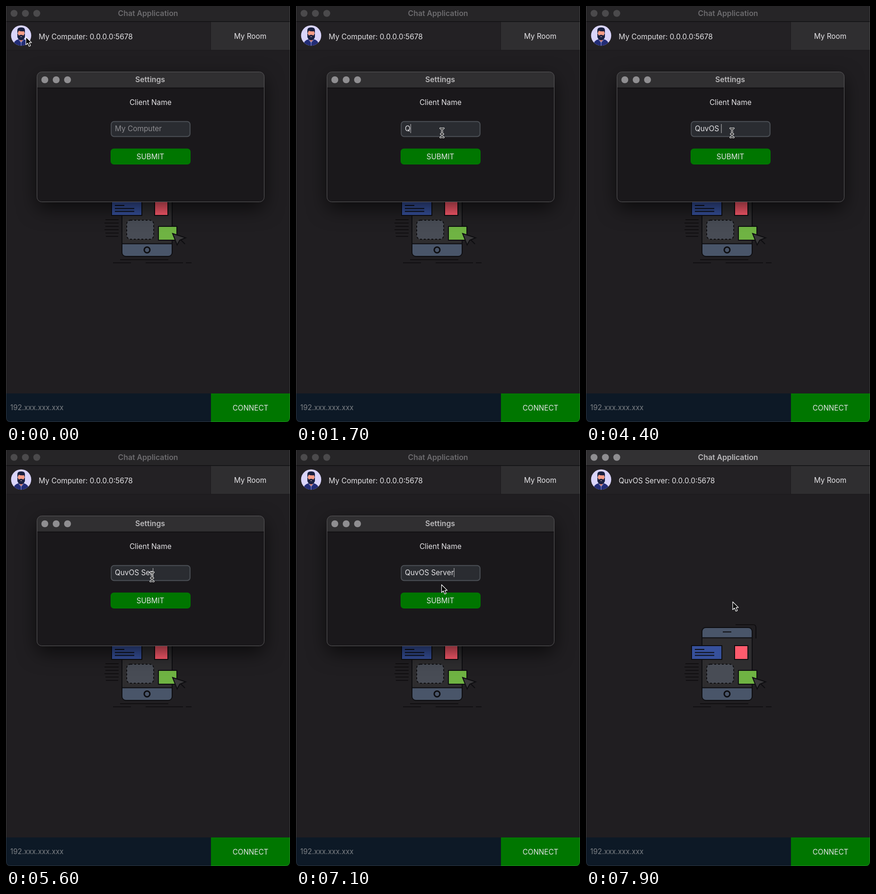
An HTML page for the animation above (8 s loop, 600 by 874 pixels).

```html
<!DOCTYPE html>
<html lang="en">
<head>
<meta charset="utf-8">
<title>Chat Application</title>
<style>
  html, body { margin: 0; width: 100%; height: 100%; overflow: hidden; background: #000; }
  svg { display: block; width: 600px; height: 874px; }
  text { font: 15.4px Inter, "Open Sans", sans-serif; fill: #e4e3e6; white-space: pre; }
  .mid { text-anchor: middle; }
  .title { font-size: 15.8px; font-weight: 600; fill: #b9b8ba; }
  .hint { fill: #7c8085; }
  .ink { stroke: #0d0d10; stroke-width: 2; }
  .thin { stroke: #0c0b0d; stroke-width: 1.7; fill: none; }
  .lights { fill: #8f8e91; }
  .inactive .bar { fill: #262527; }
  .inactive .main-title { fill: #6c6b6e; }
  .inactive .main-lights { fill: #4b4a4c; }
  .dialog-shadow { filter: drop-shadow(0 14px 20px rgba(0, 0, 0, .62)); }
</style>
</head>
<body>
<svg viewBox="0 0 600 874">
  <defs>
    <clipPath id="window"><path d="M0 0H600V864Q600 874 590 874H10Q0 874 0 864Z"/></clipPath>
    <clipPath id="face"><circle cx="32" cy="62" r="21.3"/></clipPath>
    <clipPath id="panel"><rect x="65.5" y="138.5" width="480" height="273" rx="10"/></clipPath>
    <path id="beam" d="M-3.5 -9Q0 -9 0 -6Q0 -9 3.5 -9M0 -6V7M-3.5 10Q0 10 0 7Q0 10 3.5 10M-2.5 3H2.5"/>
  </defs>

  <g id="app" clip-path="url(#window)">
    <rect width="600" height="874" fill="#201e21"/>
    <rect class="bar" width="600" height="33" fill="#323133"/>
    <rect y="32" width="600" height="1.5" fill="#0f0e10"/>
    <g class="lights main-lights">
      <circle cx="17" cy="15.5" r="7.3"/><circle cx="41" cy="15.5" r="7.3"/><circle cx="65" cy="15.5" r="7.3"/>
    </g>
    <text class="title main-title mid" x="300" y="20.7">Chat Application</text>

    <rect y="33.5" width="432" height="59" fill="#232124"/>
    <rect x="433" y="33.5" width="167" height="59" fill="#2f2e30"/>
    <path d="M432.5 33V93M0 93H600" stroke="#1b191c"/>
    <g clip-path="url(#face)">
      <rect x="10" y="40" width="44" height="44" fill="#d9d4fb"/>
      <path d="M16 84Q16 72 26 70L32 68L38 70Q48 72 48 84Z" fill="#232d76"/>
      <path d="M28 64H36V71L32 76L28 71Z" fill="#e98b78"/>
      <path d="M25 51H39V62Q38 69 32 69Q26 69 25 62Z" fill="#f59c86"/>
      <path d="M24 58V51Q24 45 31 45Q40 44 40 51V58L38 53Q32 54 27 52Z" fill="#181f3f"/>
      <path d="M24 57L27 62Q32 59 37 62L40 57V65Q38 72 32 72Q26 72 24 65Z" fill="#181f3f"/>
      <path d="M30.5 64.5H33.5" stroke="#f3d5d4"/>
      <path d="M27 71L32 77L37 71M32 77V84" fill="none" stroke="#9aa0d8"/>
    </g>
    <text id="host" x="69" y="69.6"></text>
    <text class="mid" x="516" y="68.6" font-size="15.2">My Room</text>

    <g>
      <path class="thin" d="M316 367H353Q359 367 359 373V396"/>
      <rect x="245" y="373" width="106" height="153" rx="8" fill="#2e2d2f"/>
      <path d="M245 394.500V381Q245 373 253 373H343Q351 373 351 381V394.500ZM245 499.500V518Q245 526 253 526H343Q351 526 351 518V499.500Z" fill="#495569"/>
      <path class="ink" d="M245 394.500H351M245 499.500H351M289 382.300H307"/>
      <rect class="ink" x="245" y="373" width="106" height="153" rx="8" fill="none"/>
      <circle class="ink" cx="298" cy="512.500" r="6" fill="#495569" style="stroke-width:3"/>
      <rect class="ink" x="223" y="411" width="64" height="29" fill="#36509b"/>
      <path class="ink" d="M230 419H250M230 425.500H271M230 431.500H271"/>
      <rect class="ink" x="314" y="411" width="28" height="29" fill="#ff5b6d"/>
      <rect class="ink" x="255" y="450" width="57" height="40" rx="8" fill="#484c55" stroke-dasharray="4 4"/>
      <rect class="ink" x="322" y="463" width="39" height="29" fill="#6fb343"/>
      <path class="ink" d="M369 491L378 500"/>
      <path class="ink" d="M352 478L379.500 487L367 492L361.500 502Z" fill="#39383a"/>
      <path class="thin" d="M210 449H238M208 456H238M210 463H238M208 470H238M210 477H238M211 484H237"/>
      <path class="thin" d="M241 533H343M226 539.500H264M295 539.500H374M380 539.500H392"/>
    </g>

    <rect y="814" width="433" height="60" fill="#0d1926"/>
    <rect x="433" y="814" width="167" height="60" fill="#007600"/>
    <text class="hint" x="9" y="849.300" style="font-size:15.200px">192.xxx.xxx.xxx</text>
    <text class="mid" x="516.500" y="850" style="font-size:15.200px">CONNECT</text>
    <path d="M.5 0V864Q.5 873.500 10 873.500H590Q599.500 873.500 599.500 864V0" fill="none" stroke="#fff" stroke-opacity=".13"/>
  </g>

  <g id="dialog">
    <rect class="dialog-shadow" x="65.500" y="138.500" width="480" height="273" rx="10" fill="#1a181b"/>
    <g clip-path="url(#panel)">
      <rect x="65" y="138" width="481" height="34" fill="#302f31"/>
      <rect x="65" y="171.500" width="481" height="1.200" fill="#09080a"/>
    </g>
    <rect x="65.500" y="138.500" width="480" height="273" rx="10" fill="none" stroke="#5b5a5c"/>
    <g class="lights">
      <circle cx="82" cy="155" r="7.300"/><circle cx="106" cy="155" r="7.300"/><circle cx="130" cy="155" r="7.300"/>
    </g>
    <text class="title mid" x="304.500" y="160.300">Settings</text>
    <text class="mid" x="305.300" y="207.800">Client Name</text>
    <rect x="222.300" y="242.800" width="166.500" height="31.500" rx="6" fill="#2a2c31" stroke="#4b4f55" stroke-width="2"/>
    <text id="field" x="230" y="263.400"></text>
    <rect id="caret" y="248" width="1" height="19" fill="#c9c9cc"/>
    <rect x="221" y="299.500" width="169" height="33.500" rx="7" fill="#007600"/>
    <text class="mid" x="305" y="322.300" style="font-size:15.200px">SUBMIT</text>
  </g>

  <g id="pointer">
    <path id="arrow" d="M0 0V16.500L3.800 13L6.700 19.700L9.800 18.400L7 11.900H12Z" fill="#000" stroke="#fff" stroke-width="1.200" stroke-linejoin="round"/>
    <g id="ibeam" fill="none" stroke-linecap="round">
      <use href="#beam" stroke="#fff" stroke-width="3.600"/>
      <use href="#beam" stroke="#000" stroke-width="1.300"/>
    </g>
  </g>
</svg>
<script>
  const LOOP = 8000, FOCUS = 1200, CLOSE = 7700;
  const NAME = "QuvOS Server", OLD_NAME = "My Computer";
  const keyTimes = [1600, 1900, 2200, 2500, 3500, 4200, 4800, 5200, 5500, 6000, 6300, 6700];
  // time, x, y
  const path = [[0, 42, 65], [200, 42, 65], [1100, 308.5, 266], [6800, 308.5, 266],
                [7100, 307.5, 283], [7500, 310, 319], [LOOP, 310, 319]];
  const el = id => document.getElementById(id);
  const [app, host, dialog, field, caret, pointer, arrow, ibeam] =
    ["app", "host", "dialog", "field", "caret", "pointer", "arrow", "ibeam"].map(el);
  const show = (node, on) => node.style.display = on ? "" : "none";
  const smooth = p => p * p * (3 - 2 * p);

  function pointerAt(t) {
    const i = path.findIndex(p => p[0] > t);
    const [t0, x0, y0] = path[i - 1], [t1, x1, y1] = path[i];
    const k = smooth((t - t0) / (t1 - t0));
    return [x0 + (x1 - x0) * k, y0 + (y1 - y0) * k];
  }

  function draw(t) {
    const open = t < CLOSE;
    const typed = keyTimes.filter(k => k <= t).length;
    const text = NAME.slice(0, typed);
    app.classList.toggle("inactive", open);
    host.textContent = (open ? OLD_NAME : NAME) + ": 0.0.0.0:5678";
    show(dialog, open);

    field.textContent = text || OLD_NAME;
    field.style.fill = text ? "" : "#8c8c90";
    if (open) caret.setAttribute("x", 230 + (text ? field.getComputedTextLength() : 0));
    // Every key press restarts the blink.
    const since = t - (typed ? keyTimes[typed - 1] : FOCUS);
    show(caret, since >= 0 && since % 1000 < 500);

    const [x, y] = pointerAt(t);
    const overField = x > 222 && x < 389 && y > 242 && y < 275;
    pointer.setAttribute("transform", `translate(${x} ${y})`);
    show(ibeam, overField);
    show(arrow, !overField);
  }

  const start = performance.now();
  function tick() {
    draw((performance.now() - start) % LOOP);
    requestAnimationFrame(tick);
  }
  tick();
</script>
</body>
</html>
```
